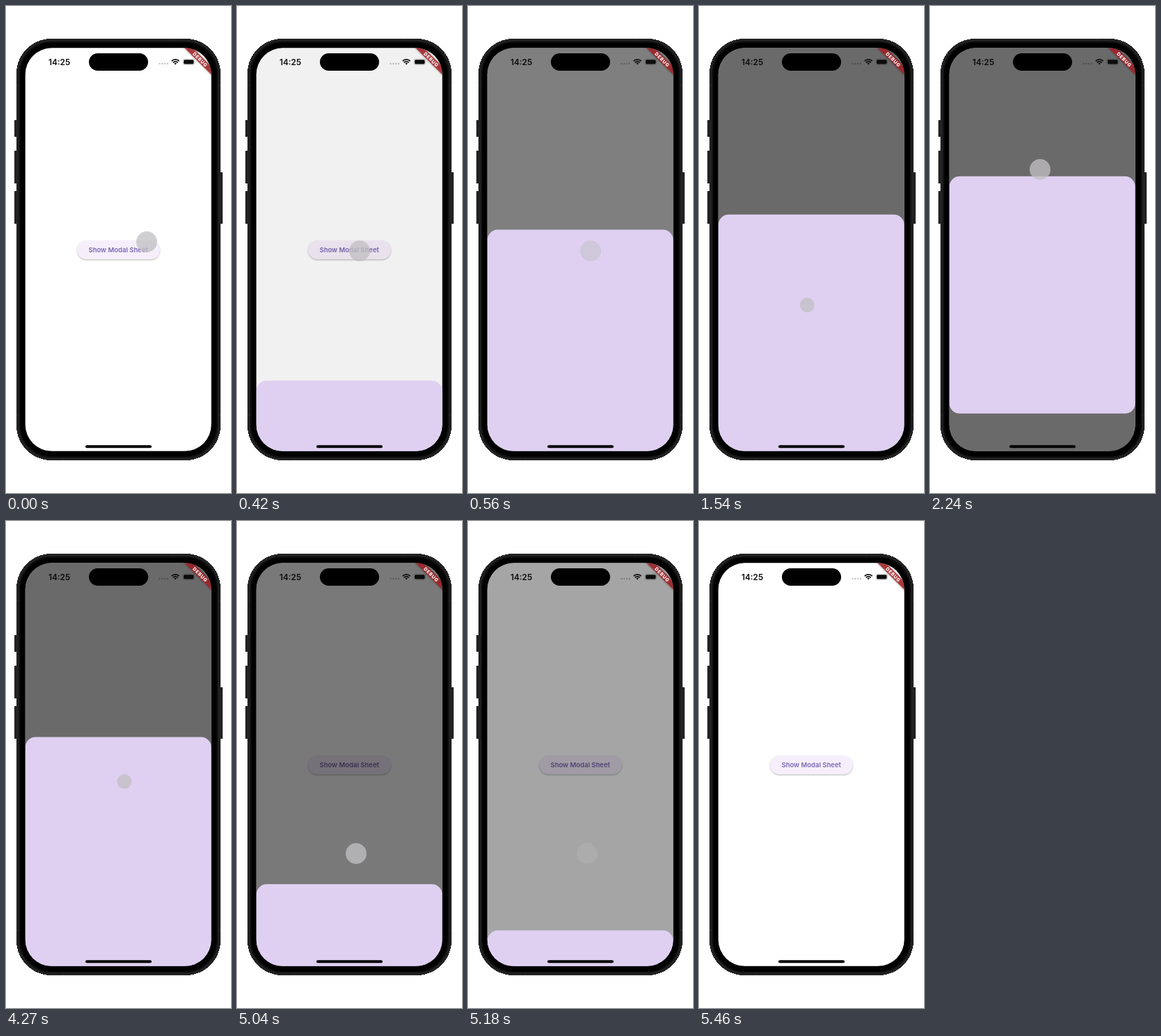
An HTML page for the animation above (6500 ms loop, 323 by 700 pixels).

```html
<!DOCTYPE html>
<html lang="en">
<head>
<meta charset="utf-8">
<title>Modal sheet</title>
<style>
  html, body { margin: 0; width: 100%; height: 100%; overflow: hidden; background: #fff; }
  svg { display: block; width: 100%; height: 100%; }
  text { font-family: Inter, Roboto, sans-serif; }
</style>
</head>
<body>
<svg viewBox="0 0 323 700">
  <defs>
    <clipPath id="screen"><rect x="27.7" y="60.3" width="267" height="579.5" rx="38"/></clipPath>
    <filter id="soft" x="-20%" y="-50%" width="140%" height="200%"><feGaussianBlur stdDeviation="1"/></filter>
    <filter id="glow" x="-20%" y="-80%" width="140%" height="260%"><feGaussianBlur stdDeviation="1.6"/></filter>
  </defs>

  <g fill="#222" shape-rendering="crispEdges">
    <rect x="12" y="164" width="5" height="24" rx="1"/>
    <rect x="12" y="208" width="5" height="47" rx="1"/>
    <rect x="12" y="266" width="5" height="47" rx="1"/>
    <rect x="306" y="239" width="5" height="74" rx="1"/>
    <rect x="15" y="47" width="293" height="606" rx="50"/>
  </g>
  <path d="M15 114h5M303 114h5M15 588h5M303 588h5M240 47v5M82 648v5" stroke="#303030"/>
  <rect x="19.5" y="51.5" width="284" height="597" rx="46" stroke="#111" stroke-width="2"/>

  <g clip-path="url(#screen)">
    <rect x="27" y="60" width="269" height="581" fill="#fff"/>
    <rect x="102" y="338.3" width="119" height="27" rx="13.5" fill="#000" opacity=".26" filter="url(#soft)"/>
    <rect x="102" y="337" width="119" height="27" rx="13.5" fill="#f6effb"/>
    <text x="161.2" y="354" text-anchor="middle" font-size="9.5" font-weight="600" fill="#7a66b0">Show Modal Sheet</text>
    <rect id="scrim" x="27" y="60" width="269" height="581" fill="#020003"/>
    <rect id="sheet" x="27.7" width="267" height="341" rx="15" fill="#dfd0f2"/>

    <g transform="translate(295 60.5) rotate(45)">
      <rect x="-30" y="19" width="60" height="8.2" opacity=".45" filter="url(#glow)"/>
      <rect x="-30" y="19" width="60" height="8.2" fill="#b02428" fill-opacity=".8"/>
      <text x=".3" y="25.6" text-anchor="middle" font-size="6.8" font-weight="800" letter-spacing=".7" fill="#fff">DEBUG</text>
    </g>
  </g>

  <text x="61" y="84.6" font-size="11.8" font-weight="600" fill="#0c0c0c">14:25</text>
  <rect x="119" y="68" width="85" height="25" rx="12.5"/>
  <path d="M220.5 83h12" stroke="#000" stroke-opacity=".25" stroke-width="2.3" stroke-linecap="round" stroke-dasharray="0 3.8"/>
  <g fill="none" stroke="#0c0c0c" stroke-width="1.7">
    <path d="M237.7 79.2a7.6 7.6 0 0 1 11 0M239.7 81.4a4.8 4.8 0 0 1 7 0"/>
    <path d="M241.4 82.6a2.6 2.6 0 0 1 3.6 0L243.2 84.6z" fill="#0c0c0c" stroke="none"/>
  </g>
  <rect x="253.8" y="76" width="17" height="8.6" rx="2.6" fill="none" stroke="#000" stroke-opacity=".25" stroke-width=".7"/>
  <rect x="255" y="77.2" width="14.6" height="6.2" rx="1.6" fill="#0c0c0c"/>
  <rect x="114" y="631.3" width="95" height="4" rx="2"/>

  <circle id="touch" fill="#c0bfc2"/>
</svg>
<script>
const LOOP = 6500, STEP = 70;
const OPEN = 299.8, CLOSED = 640, DIM = 0.583, SLOP = 24.5, PULL = 65;
const scrim = document.getElementById('scrim');
const sheet = document.getElementById('sheet');
const touch = document.getElementById('touch');

// Each finger fades in, presses, moves until it lifts, then fades out
const tap = { show: -140, press: 70, move: 0, lift: 280, hide: 490, from: [202, 339], to: [176, 352] };
const pull = { show: 770, press: 1120, move: 1470, lift: 2170, hide: 2450, from: [155, 445], to: [158, 235] };
const dismiss = { show: 3430, press: 3780, move: 4060, lift: 4760, hide: 5040, from: [169.5, 339.5], to: [171, 478] };

const opening = { start: 390, length: 300 };
const settling = { start: 2200, length: 740 };
const closing = { start: 4855, length: 500 };

const phase = (t, start, length) => Math.min(1, Math.max(0, (t - start) / length));
const during = (t, span) => phase(t, span.start, span.length);
const mix = (a, b, p) => a + (b - a) * p;

// CSS-style cubic bezier, solved by bisection
function bezier(x1, y1, x2, y2) {
  const at = (a, b, s) => 3 * a * s * (1 - s) ** 2 + 3 * b * s * s * (1 - s) + s ** 3;
  return x => {
    let lo = 0, hi = 1;
    for (let n = 0; n < 24; n++) {
      const mid = (lo + hi) / 2;
      if (at(x1, x2, mid) < x) lo = mid; else hi = mid;
    }
    return at(y1, y2, (lo + hi) / 2);
  };
}
const ease = bezier(0.25, 0.1, 0.25, 1);
const emphasized = bezier(0.2, 0.5, 0.15, 1);

function finger(g, t) {
  const p = phase(t, g.move, g.lift - g.move) ** 1.14;
  return {
    cx: mix(g.from[0], g.to[0], p),
    cy: mix(g.from[1], g.to[1], p),
    r: 15 - 4.5 * (phase(t, g.press, 140) - phase(t, g.lift, 70)),
    opacity: 0.77 * (phase(t, g.show, 140) - phase(t, g.hide, 210)),
  };
}

function sheetTop(t) {
  if (t < pull.show) return mix(CLOSED, OPEN, emphasized(during(t, opening)));

  const raised = phase(pull.from[1] - finger(pull, t).cy, SLOP, 185);
  const bounce = PULL * Math.sin(raised * Math.PI / 2) * (1 - during(t, settling)) ** 3;
  const dragged = Math.max(0, finger(dismiss, t).cy - dismiss.from[1] - SLOP);
  const fall = 1 - (1 - during(t, closing)) ** 1.41;
  return mix(OPEN - bounce + dragged, CLOSED, fall);
}

function draw(t) {
  const active = [dismiss, pull, tap].find(g => t >= g.show);
  const attrs = finger(active, t);
  for (const name in attrs) touch.setAttribute(name, attrs[name]);
  sheet.setAttribute('y', sheetTop(t));
  scrim.setAttribute('opacity', DIM * ease(during(t, opening) - during(t, closing)));
}

const start = performance.now();
function tick() {
  const t = (performance.now() - start) % LOOP;
  draw(Math.floor(t / STEP) * STEP);
  requestAnimationFrame(tick);
}
draw(0);
requestAnimationFrame(tick);
</script>
</body>
</html>
```
